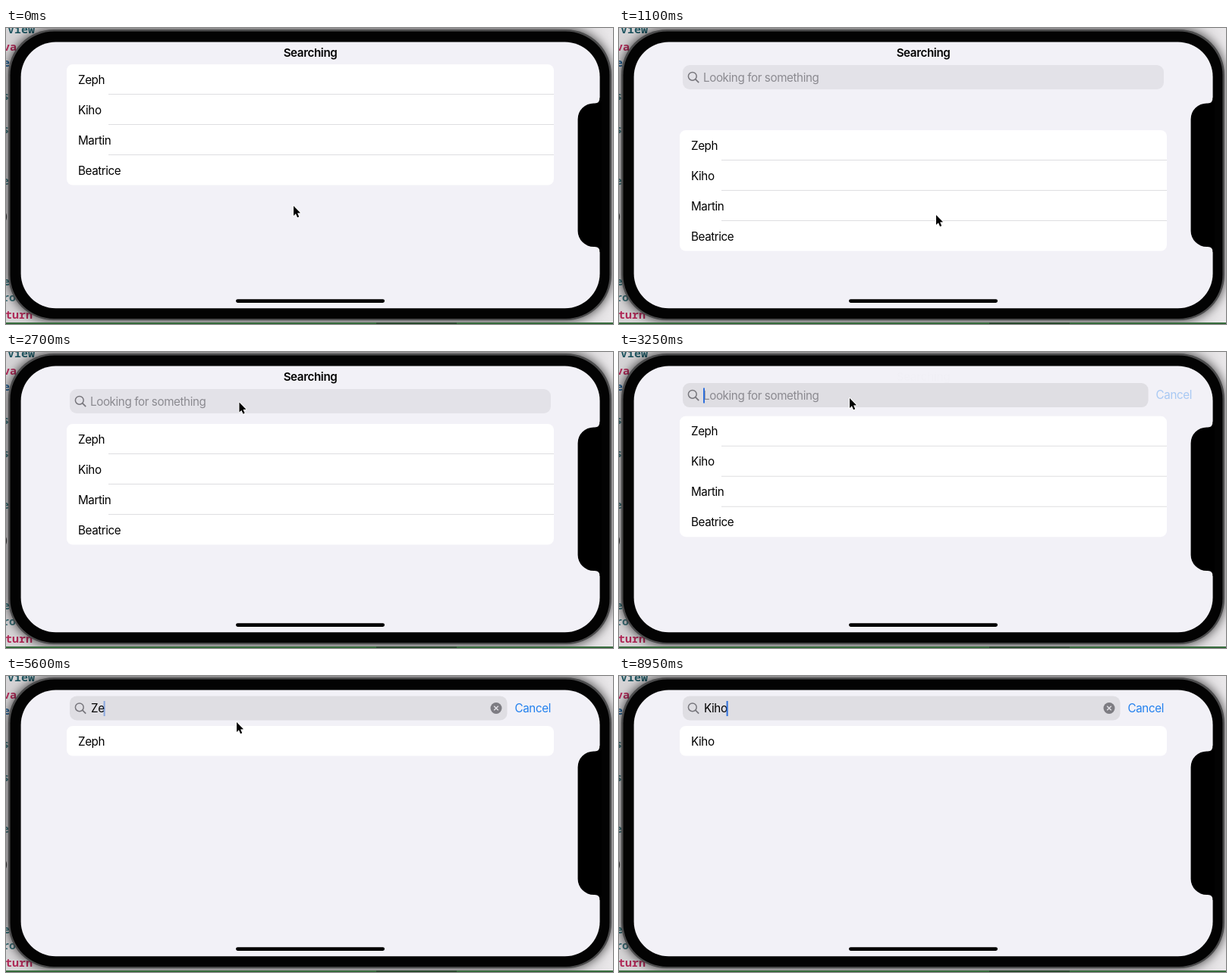
Recreate the animation shown at these times as an HTML page with a canvas. Size 800 px wide and 391 px high, loop 9100 ms.

```html
<!DOCTYPE html>
<html lang="en">
<head>
<meta charset="utf-8">
<title>Searching</title>
<style>
  html, body { margin: 0; width: 100%; height: 100%; overflow: hidden; background: #b5b4b5; }
  canvas { display: block; }
</style>
</head>
<body>
<canvas id="stage" width="800" height="391"></canvas>
<script>
const ctx = document.getElementById('stage').getContext('2d');
const LOOP = 9100;
const NAMES = ['Zeph', 'Kiho', 'Martin', 'Beatrice'];
const ROW = 40;
const SCREEN = '#f2f1f7';
const BLUE = '#2280ee';

const clamp = v => Math.max(0, Math.min(1, v));
const mix = (a, b, k) => a + (b - a) * k;
const ease = k => k * k * (3 - 2 * k);
const ramp = (t, from, to) => clamp((t - from) / (to - from));

// Keys are [time, value...]; values ease between neighbours.
function track(keys, t) {
  let i = 0;
  while (i < keys.length - 2 && t >= keys[i + 1][0]) i++;
  const a = keys[i], b = keys[i + 1];
  const k = ease(ramp(t, a[0], b[0]));
  return a.slice(1).map((v, n) => mix(v, b[n + 1], k));
}

const POINTER = [
  [0, 379, 235], [300, 400, 165], [1000, 418, 247], [1250, 418, 247],
  [1600, 413, 234], [1800, 411, 229], [1950, 396, 210], [2800, 304, 61],
  [7900, 304, 61], [8550, 775, -20]
];
const PULL = [[0, 48], [280, 48], [980, 135], [1200, 135], [1720, 95]];
const TYPING = [[0, ''], [4200, 'Z'], [4350, 'Ze'], [5850, 'K'], [6850, 'Ki'], [7350, 'Kih'], [7550, 'Kiho']];
const CARET = [
  [3100, 0], [3200, 1], [3600, 1], [3700, 0], [3750, 0], [3850, 1], [4850, 1], [5000, 0],
  [5150, 0], [5350, 1], [5550, 1], [5650, 0], [5800, 0], [5850, 1], [6450, 1], [6650, 0],
  [6800, 0], [6850, 1], [7900, 1], [8050, 0], [8350, 0], [8550, 1]
];

function box(x, y, w, h, r, fill) {
  ctx.beginPath();
  ctx.roundRect(x, y, w, h, r);
  ctx.fillStyle = fill;
  ctx.fill();
}

function line(points, color, width) {
  ctx.beginPath();
  points.forEach(([x, y], i) => i ? ctx.lineTo(x, y) : ctx.moveTo(x, y));
  ctx.strokeStyle = color;
  ctx.lineWidth = width;
  ctx.stroke();
}

function label(text, x, y, color, { alpha = 1, weight = 400, align = 'left' } = {}) {
  ctx.save();
  ctx.globalAlpha *= alpha;
  ctx.font = `${weight} 15.2px Inter, sans-serif`;
  ctx.letterSpacing = '-0.4px';
  ctx.textAlign = align;
  ctx.fillStyle = color;
  ctx.fillText(text, x, y);
  const width = ctx.measureText(text).width;
  ctx.restore();
  return width;
}

function drawDesk() {
  const shade = ctx.createLinearGradient(0, 0, 800, 0);
  shade.addColorStop(0, '#d6d4d6');
  shade.addColorStop(0.9, '#d2d0d2');
  shade.addColorStop(1, '#eae8ea');
  ctx.fillStyle = shade;
  ctx.fillRect(0, 0, 800, 391);
  const code = [
    ['View', 2, 7, '#1f5560'], ['va', -4, 30, '#b02a58'], ['e', -4, 51, '#1f5c8f'],
    ['s', -5, 95, '#3d7078'], ['s', -5, 139, '#3d7078'], ['e', -5, 207, '#3d7078'],
    [')', -5, 253, '#444'], ['e', -4, 340, '#2b6a72'], ['ro', -5, 361, '#3d7078'], ['turn', -1, 384, '#b02a58']
  ];
  ctx.font = '600 15px "Noto Sans Mono", monospace';
  for (const [text, x, y, color] of code) {
    ctx.fillStyle = color;
    ctx.fillText(text, x, y);
  }
}

function drawPhone() {
  ctx.save();
  ctx.shadowColor = 'rgba(0,0,0,.75)';
  ctx.shadowBlur = 14;
  box(3, 2, 795, 384, 60, '#4c4c4d');
  ctx.restore();
  box(5.5, 4.5, 790, 379.5, 58, '#030303');
  box(19.6, 18.6, 763, 351.6, 46, SCREEN);
  ctx.fillStyle = '#356b3b';
  ctx.fillRect(0, 389, 800, 2);
  ctx.fillStyle = '#284a2d';
  ctx.fillRect(488, 389, 106, 2);
}

function drawNotch() {
  ctx.beginPath();
  ctx.moveTo(785, 92);
  ctx.lineTo(782.6, 92);
  ctx.quadraticCurveTo(782.6, 99.4, 776, 99.4);
  ctx.arcTo(753.6, 99.4, 753.6, 120, 21);
  ctx.arcTo(753.6, 289, 776, 289, 21);
  ctx.lineTo(776, 289);
  ctx.quadraticCurveTo(782.6, 289, 782.6, 296);
  ctx.lineTo(785, 296);
  ctx.fillStyle = '#000';
  ctx.fill();
  box(303, 358.2, 196, 4.8, 2.4, '#000');
}

function drawList(top, t) {
  const rest = 1 - ease(ramp(t, 4200, 4400));
  const swap = ease(ramp(t, 5850, 6050));
  const height = ROW * mix(1, 4, rest) - 0.5;
  ctx.save();
  ctx.beginPath();
  ctx.roundRect(80, top, 642, height, 8);
  ctx.fillStyle = '#fff';
  ctx.fill();
  ctx.clip();
  NAMES.forEach((name, i) => {
    const y = top + i * ROW;
    label(name, 95, y + 25.5, '#000', { alpha: i ? rest : 1 - swap });
    if (i && rest) {
      ctx.fillStyle = `rgba(222,222,225,${rest})`;
      ctx.fillRect(135, y - 1, 587, 1);
    }
  });
  label(NAMES[1], 95, top + 25.5, '#000', { alpha: swap });
  ctx.restore();
}

function drawClear(x, y) {
  box(x - 7.5, y - 7.5, 15, 15, 7.5, '#7d7c82');
  line([[x - 2.8, y - 2.8], [x + 2.8, y + 2.8]], '#e2e1e6', 1.4);
  line([[x + 2.8, y - 2.8], [x - 2.8, y + 2.8]], '#e2e1e6', 1.4);
}

function drawField(top, reveal, focus, t) {
  const height = 32 * reveal;
  const right = mix(718, 660.5, focus);
  if (height < 0.5) return;
  const typed = TYPING.findLast(([at]) => t >= at)[1];
  ctx.save();
  ctx.beginPath();
  ctx.roundRect(84, top, right - 84, height, Math.min(9, height / 2));
  ctx.fillStyle = t < 3050 ? '#e3e2e8' : '#dfdee3';
  ctx.fill();
  ctx.clip();
  ctx.globalAlpha = clamp((reveal - 0.6) / 0.4);
  const middle = top + height / 2;
  ctx.beginPath();
  ctx.arc(96.8, middle - 1.2, 5.4, 0, Math.PI * 2);
  ctx.strokeStyle = '#77767c';
  ctx.lineWidth = 1.5;
  ctx.stroke();
  line([[100.7, middle + 2.7], [105.2, middle + 7.2]], '#77767c', 1.7);
  let caretX = 111;
  if (typed) {
    caretX += label(typed, 112, middle + 5.5, '#000');
    drawClear(646, middle);
  } else {
    label('Looking for something', 111, middle + 5.5, '#8b8a90');
  }
  ctx.globalAlpha = track(CARET, t)[0];
  ctx.fillStyle = '#2f70dc';
  ctx.fillRect(caretX, middle - 9.5, 2, 20);
  ctx.restore();
}

function drawPointer([x, y]) {
  ctx.save();
  ctx.translate(x, y);
  ctx.beginPath();
  [[0, 0], [0, 13], [2.9, 10.3], [5.1, 15.2], [7.2, 14.2], [5.1, 9.5], [9, 9.2]]
    .forEach(([px, py]) => ctx.lineTo(px, py));
  ctx.closePath();
  ctx.lineJoin = 'round';
  ctx.strokeStyle = '#fff';
  ctx.lineWidth = 1.8;
  ctx.stroke();
  ctx.fillStyle = '#000';
  ctx.fill();
  ctx.restore();
}

function draw(t) {
  const focus = ease(ramp(t, 3050, 3550));
  const pulled = track(PULL, t)[0];
  const listTop = pulled - 29 * focus;
  drawDesk();
  drawPhone();
  drawList(listTop, t);
  label('Searching', 401, 38, '#000', { alpha: clamp(1 - 2.8 * focus), weight: 600, align: 'center' });
  drawField(mix(49, 26.5, focus), clamp((pulled - 48) / 47), focus, t);
  label('Cancel', mix(728, 670.5, focus), mix(70, 47.5, focus), BLUE, { alpha: focus });
  drawNotch();
  drawPointer(track(POINTER, t));
}

const start = performance.now();
function frame(now) {
  draw(Math.max(0, now - start) % LOOP);
  requestAnimationFrame(frame);
}
draw(0);
requestAnimationFrame(frame);
</script>
</body>
</html>
```
